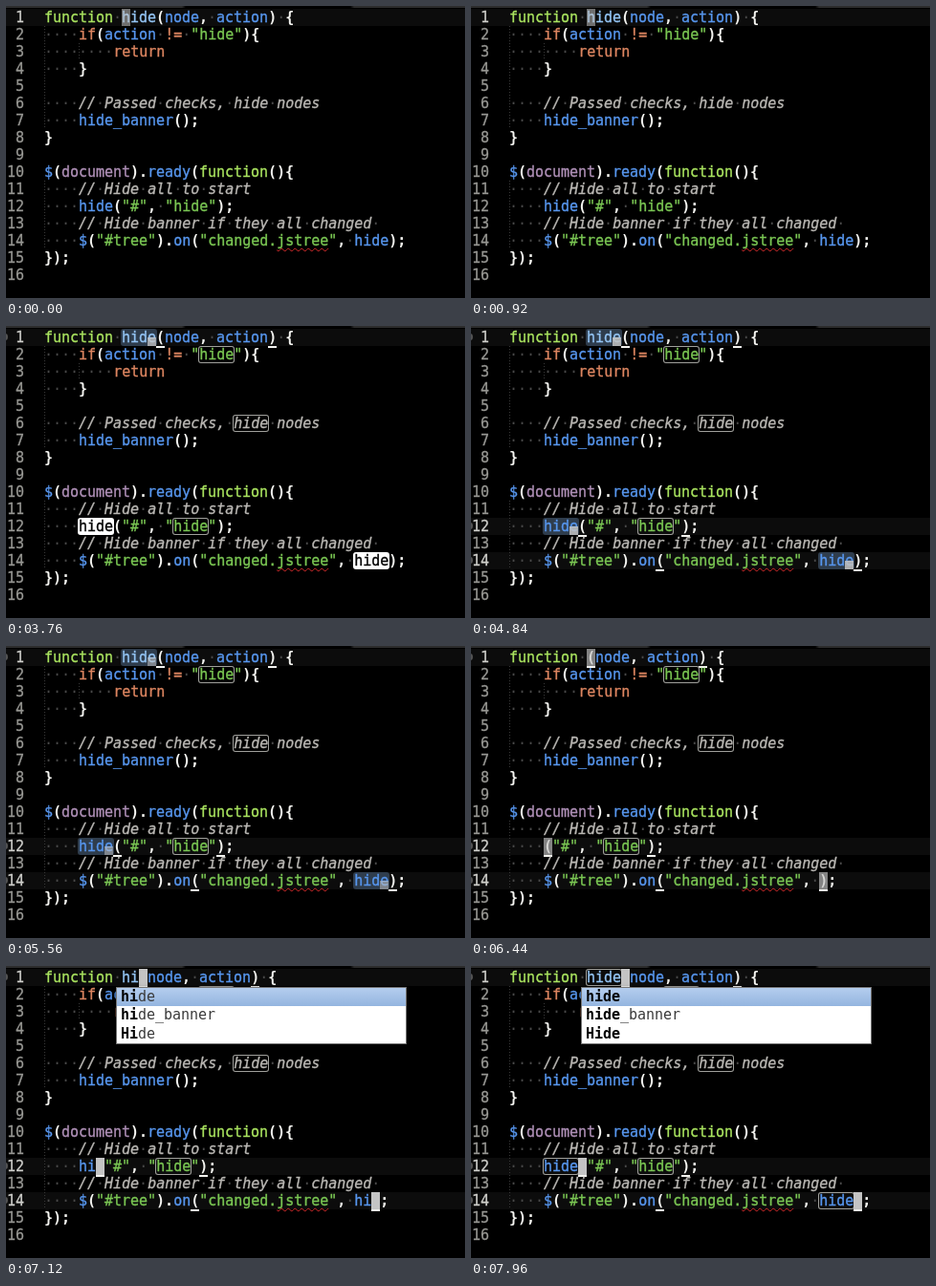
Animation, 480 px wide and 306 px high, one loop 8000 ms. Source, as an HTML page:

```html
<!DOCTYPE html>
<html lang="en">
<head>
<meta charset="utf-8">
<title>Multiple selection</title>
<style>
html, body { margin: 0; width: 100%; height: 100%; overflow: hidden; background: #000; }
#stage { position: absolute; left: 0; top: 0; width: 480px; height: 306px; overflow: hidden;
  background: #000; color: #f4f4f0; font: 15px/18px "DejaVu Sans Mono", monospace; letter-spacing: -.03px; }
#tabs { position: absolute; left: 0; top: 0; width: 480px; height: 2px;
  background: linear-gradient(90deg, #2c2c2c 184px, #000 188px 360px, #2c2c2c 364px); }
.row { position: absolute; left: 0; width: 480px; height: 18px; white-space: pre; }
.row.on { background: #0c0c0c; }
.row.mark::before { content: ""; position: absolute; left: -4px; top: 5px; width: 6px; height: 7px;
  border-radius: 50%; background: #555; }
.num { position: absolute; left: 0; width: 19px; text-align: right; color: #989894; -webkit-text-stroke: .3px; }
.on .num { color: #d0d0cc; }
.code { position: absolute; left: 40px; top: 0; font-weight: bold; }
.code span { font-weight: normal; -webkit-text-stroke: .35px; }
.code .br { font-weight: bold; -webkit-text-stroke: 0; }
.guide { position: absolute; top: 0; width: 1px; height: 18px;
  background: repeating-linear-gradient(#383838 0 1px, transparent 1px 3px); }
.k { color: #a9e35f; }
.n { color: #5796ee; }
.e { color: #93c4f4; }
.o { color: #dc8560; }
.s { color: #7ac653; }
.d { color: #ae8fb6; }
.c { color: #bab8b4; font-style: italic; }
.code .sp { color: #484848; font-style: normal; -webkit-text-stroke: 0; }
.bad { text-decoration: underline wavy #d02a2a 1px; text-underline-offset: 2px; text-decoration-skip-ink: none; }
.w { display: inline-block; height: 18px; margin: 0 -1px; padding: 0 1px; vertical-align: top; border-radius: 3px; }
.box { box-shadow: inset 0 0 0 1px #a0a09c; }
.sel { background: #2f3d4d; }
.hit { background: #fff; color: #000; }
.br { position: relative; display: inline-block; height: 18px; vertical-align: top; }
.br.under::after { content: ""; position: absolute; left: 0; top: 18px; width: 9px; height: 2px; background: #f4f4f0; }
.caret { position: relative; z-index: 1; display: inline-block; width: 0; height: 18px; vertical-align: top; }
.caret i { position: absolute; left: 0; top: 0; width: 9px; height: 18px; background: #c4c4c4; }
#popup { position: absolute; left: 115px; top: 22px; width: 302px; height: 58px; border: 1px solid #777;
  background: #fff; color: #3a3a3a; box-shadow: 0 2px 5px #0009; z-index: 2; }
#popup div { height: 19.3px; line-height: 19px; padding-left: 4px; white-space: pre; }
#popup div:first-child { background: linear-gradient(#b4cdee, #94b5df); }
#popup b { color: #000; }
</style>
</head>
<body>
<div id="stage"></div>
<script>
// {class text} colours a token, @ is an edited word, br marks a bracket
const source = [
  "{k function} @{br (}{n node}, {n action}{br )} {",
  "    {o if}({n action} {o !=} {s \"}{m hide}{s \"}){",
  "        {o return}",
  "    }",
  "",
  "    {c // Passed checks, }{mc hide}{c  nodes}",
  "    {n hide_banner}();",
  "}",
  "",
  "{n $}({d document}).{n ready}({k function}(){",
  "    {c // Hide all to start}",
  "    @{br (}{s \"#\"}, {s \"}{m hide}{s \"}{br )};",
  "    {c // Hide banner if they all changed }",
  "    {n $}({s \"#tree\"}).{n on}{br (}{s \"changed.}{bad jstree}{s \"}, @{br )};",
  "});",
  ""
];
const classes = { m: "w s m", mc: "w c m", bad: "s bad" };
const dots = s => s.replace(/ /g, "\u0001");
const html = line => dots(line.replace(/\{(k|n|o|s|d|c|mc|m|bad|br) ([^}]+)\}/g,
    (all, c, text) => `<span\u0002class="${(classes[c] || c).replace(/ /g, "\u0002")}">${text}</span>`))
  .replace(/@/g, '<span class="w n word"></span><span class="caret"><i></i></span>')
  .replace(/\u0001/g, '<span class="sp">·</span>').replace(/\u0002/g, " ");

const guides = i => (i > 0 && i < 7 || i > 9 && i < 14 ? [0] : []).concat(i === 2 ? [36] : []);
const stage = document.getElementById("stage");
stage.innerHTML = '<div id="tabs"></div>' + source.map((line, i) =>
  `<div class="row" style="top:${3 + 18 * i}px"><span class="num">${i + 1}</span><span class="code">` +
  guides(i).map(x => `<span class="guide" style="left:${x}px"></span>`).join("") +
  html(line) + "</span></div>").join("") + '<div id="popup"></div>';
// the code wrapper itself keeps the bold weight used for punctuation

const all = (q, root = stage) => [...root.querySelectorAll(q)];
const popup = document.getElementById("popup");
const matches = all(".m");
const edits = all(".word").map(word => {
  const row = word.closest(".row");
  return { word, row, caret: row.querySelector(".caret i"), brackets: all(".br", row) };
});
edits[0].word.classList.replace("n", "e");

const LOOP = 8000, SELECT = 3080, HIT = 3480, CLEAR = 5680, POPUP = 6680;
const picks = [SELECT, 4320, 4800];
const keys = [...picks, CLEAR, 6640, 7040, 7400, 7680];
const typed = t => t < CLEAR ? "hide" : "hide".slice(0, keys.slice(4).filter(k => k <= t).length);

// the caret stays solid for a while after a key, then pulses
function glow(t) {
  const last = keys.filter(k => k <= t).pop();
  const phase = last ? Math.max(0, t - last - 540) : t < 2960 ? t + 50 : 0;
  return Math.min(1, Math.max(0, .5 + .6 * Math.cos(phase * 2 * Math.PI / 1050)));
}

function list(prefix) {
  const n = prefix.length;
  popup.innerHTML = ["hide", "hide_banner", "Hide"]
    .map(s => `<div><b>${s.slice(0, n)}</b>${s.slice(n)}</div>`).join("");
}

let shown = null;
function draw(t) {
  const text = typed(t), insert = t >= CLEAR;
  edits.forEach((e, i) => {
    const picked = t >= picks[i], active = i === 0 || picked;
    const half = picked && !insert;
    const style = e.word.classList;
    e.word.textContent = text;
    style.toggle("sel", half);
    style.toggle("hit", !picked && t >= HIT);
    style.toggle("box", !picked && t >= SELECT && t < HIT || text === "hide" && insert);
    e.row.classList.toggle("on", active);
    e.row.classList.toggle("mark", picked);
    e.brackets.forEach(b => b.classList.toggle("under", picked));
    const c = e.caret.style;
    c.display = active ? "" : "none";
    c.left = (insert ? 0 : picked ? -9 : -36) + "px";
    c.top = half ? "9px" : "0";
    c.height = half ? "9px" : "18px";
    c.opacity = glow(t) * (insert ? 1 : half ? .85 : .55);
  });
  matches.forEach(m => m.classList.toggle("box", t >= SELECT));
  popup.style.display = t >= POPUP ? "" : "none";
  if (text !== shown) list(shown = text);
}

const start = performance.now();
function tick() {
  draw((performance.now() - start) % LOOP);
  requestAnimationFrame(tick);
}
tick();
</script>
</body>
</html>
```
